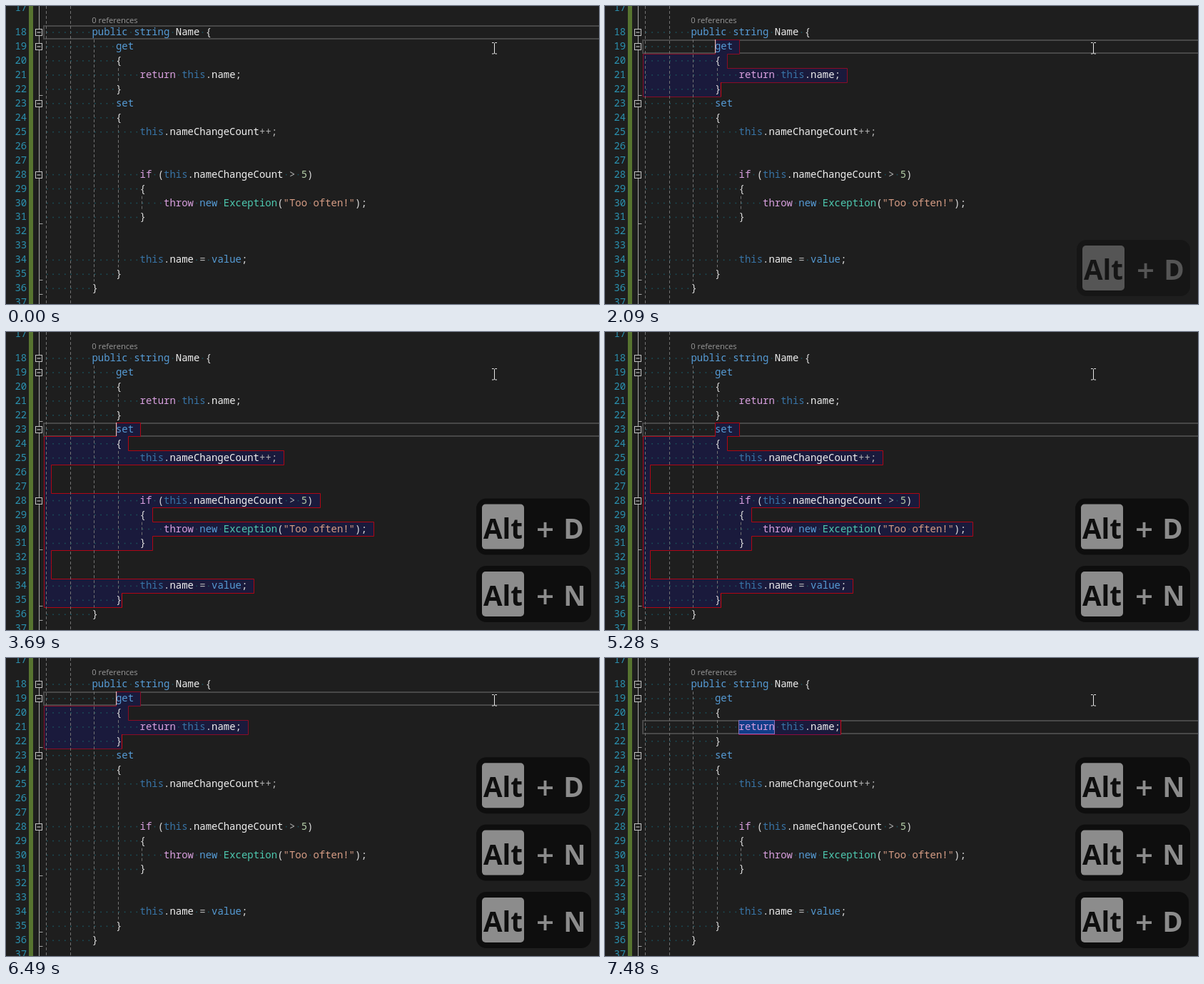
Recreate the animation shown at these times as an HTML page. Size 831x418 px, loop 8000 ms.

```html
<!DOCTYPE html>
<html lang="en">
<head>
<meta charset="utf-8">
<title>Code selection</title>
<style>
  html, body { margin: 0; width: 100%; height: 100%; overflow: hidden; background: #1e1e1e; }
  svg { display: block; width: 831px; height: 418px; }
  .code { font: 13.96px "Noto Sans Mono", "DejaVu Sans Mono", monospace; }
  .lens { font: 11.2px "Open Sans", "Noto Sans", sans-serif; }
  .key { font: 700 38.5px "Open Sans", "Noto Sans", sans-serif; }
  .plus { font: 600 44px "Open Sans", "Noto Sans", sans-serif; }
  .badge { font: 10px "Open Sans", "Noto Sans", sans-serif; }
</style>
</head>
<body>
<svg viewBox="0 0 831 418">
  <rect width="831" height="418" fill="#1e1e1e"/>
  <g id="backLayer"></g>
  <g id="codeLayer"></g>
  <g id="frontLayer"></g>
</svg>
<script>
(() => {
const FIRST = 18, ROW = 19.96, LEFT = 53.5, CHAR = 8.376, LOOP = 8000;

// [indent, text] for each line from FIRST on
const lines = [
  [8, 'public string Name {'],
  [12, 'get'],
  [12, '{'],
  [16, 'return this.name;'],
  [12, '}'],
  [12, 'set'],
  [12, '{'],
  [16, 'this.nameChangeCount++;'],
  [0, ''],
  [0, ''],
  [16, 'if (this.nameChangeCount > 5)'],
  [16, '{'],
  [20, 'throw new Exception("Too often!");'],
  [16, '}'],
  [0, ''],
  [0, ''],
  [16, 'this.name = value;'],
  [12, '}'],
  [8, '}']
];

const colX = col => LEFT + col * CHAR;
const rowTop = n => 27.2 + (n - FIRST) * ROW;
const baseline = n => rowTop(n) + 13.8;
const escapeText = s => s.replace(/&/g, '&amp;').replace(/</g, '&lt;').replace(/>/g, '&gt;');
const rect = (x, y, w, h, fill, extra = '') =>
  `<rect x="${x}" y="${y}" width="${w}" height="${h}" fill="${fill}" ${extra}/>`;
const text = (x, y, cls, fill, s) =>
  `<text x="${x}" y="${y}" class="${cls}" fill="${fill}">${escapeText(s)}</text>`;
const path = (d, stroke, extra = '') =>
  `<path d="${d}" fill="none" stroke="${stroke}" ${extra}/>`;

function color(token) {
  if (token === 'this') return '#3874a6';
  if (/^(public|string|get|set|new|value)$/.test(token)) return '#569cd6';
  if (/^(return|if|throw)$/.test(token)) return '#d8a0df';
  if (token === 'Exception') return '#4ec9b0';
  if (token[0] === '"') return '#d69d85';
  if (/^\d/.test(token)) return '#b5cea8';
  if (/^[>=+]/.test(token)) return '#b4b4b4';
  return /^\w/.test(token) ? '#f0f0f0' : '#dcdcdc';
}

function codeLine([indent, source], i) {
  const n = FIRST + i;
  let out = '';
  for (const m of source.matchAll(/"[^"]*"|\w+|[^\w\s"]+/g))
    out += text(colX(indent + m.index), baseline(n), 'code', color(m[0]), m[0]);
  [...' '.repeat(indent) + source].forEach((c, col) => {
    if (c === ' ') out += rect(colX(col + 0.5) - 0.8, rowTop(n) + 9, 1.6, 1.6, '#1b505b');
  });
  return out;
}

function editor() {
  let out = rect(32, 0, 6, 418, '#577430') + path('M46.5 0V418', '#a5a5a5');
  for (const n of [22, 31, 35, 36])
    out += path(`M46.5 ${Math.round(rowTop(n + 1)) - 1.5}h5`, '#a5a5a5');
  for (const n of [18, 19, 23, 28]) {
    const y = Math.round(rowTop(n)) + 5.5;
    out += rect(41.5, y, 9, 9, '#1e1e1e', 'stroke="#c4c4c4"') + path(`M43.5 ${y + 4.5}h5`, '#e0e0e0');
  }
  const guides = [[56.5, 0, 418], [90.5, 0, 418], [123.5, rowTop(19), rowTop(36)],
    [157.5, rowTop(21), rowTop(22)], [157.5, rowTop(25), rowTop(35)], [190.5, rowTop(30), rowTop(31)]];
  for (const [x, y1, y2] of guides)
    out += path(`M${x} ${y1}V${y2}`, '#727272', 'stroke-dasharray="4 3"');
  out += text(12.5, 7, 'code', '#2b91af', '17');
  for (let n = FIRST; n <= 37; n++) out += text(12.5, baseline(n), 'code', '#2b91af', String(n));
  out += text(120.3, 24, 'lens', '#999', '0 references');
  return out + lines.map(codeLine).join('');
}

function selection(from, to, stroke) {
  const x0 = colX(lines[from - FIRST][0]);
  const pts = [[x0, rowTop(from)]];
  let end;
  for (let n = from; n <= to; n++) {
    const [indent, source] = lines[n - FIRST];
    end = colX(indent + source.length) + (n < to ? 9.6 : 0.5);
    pts.push([end, rowTop(n)], [end, rowTop(n + 1)]);
  }
  if (to > from) pts.push([LEFT, rowTop(to + 1)], [LEFT, rowTop(from + 1)]);
  pts.push([x0, rowTop(from + 1)]);
  const snapped = pts.map(p => p.map(v => Math.floor(v) + 0.5).join()).join(' ');
  return `<polygon points="${snapped}" fill="#1a1a3c" stroke="${stroke}"/>` +
    path(`M${Math.floor(end) + 0.5} ${rowTop(to)}v${ROW}`, '#cc0812');
}

const currentLine = n =>
  rect(53, Math.round(rowTop(n)) + 1, 790, 18, 'none', 'stroke="#484848" stroke-width="2"');

function panel(letter, x, y, opacity) {
  return `<g transform="translate(${x} ${y})" opacity="${opacity}">` +
    rect(0, 0, letter === 'N' ? 161 : 159, 79, '#0e0e0e', 'rx="14" fill-opacity=".96"') +
    rect(8, 8, 59, 63, '#8c8c8c', 'rx="5"') +
    text(10, 56, 'key', '#0e0e0e', 'Alt') +
    text(84, 59, 'plus', '#8c8c8c', '+') +
    text(122.3, 56, 'key', '#8c8c8c', letter) + '</g>';
}

function panels(letters, topOpacity) {
  const x = letters.includes('N') ? 659 : 661;
  return [...letters].map((c, i) =>
    panel(c, x, 328 - 94.4 * (letters.length - 1 - i), i ? 1 : topOpacity)).join('');
}

const pointer = path('M681 51.5h2.5l1 1l1-1h2.5M684.5 52.5V66M681 67h2.5l1-1l1 1h2.5', '#e8e8e8');

// The last entry whose start has passed
const at = (t, steps) => steps.filter(s => s[0] <= t).pop();

const cursorLines = [[0, 18], [2090, 19], [3690, 23], [5530, 19], [6990, 21]];
const blinks = [390, 830, 1360, 1960, 2090, 2630, 3160, 3690, 4220, 4750, 5280, 5530, 5990, 6490, 6990, 7480];
const resets = [2090, 3690, 5530, 6990];
const keys = [[0, '', 1], [2090, 'D', 0.5], [2210, 'D', 1], [3690, 'DN', 1], [5530, 'DNN', 1],
  [6990, 'DNND', 0.9], [7110, 'DNND', 0.4], [7230, 'NND', 1]];
const blocks = { 19: [19, 22, '#8a0c26'], 23: [23, 35, '#b00614'], 21: [21, 21, '#8a0c40'] };

function caretOn(t) {
  let on = false;
  for (const b of blinks) if (b <= t) on = resets.includes(b) || !on;
  return on;
}

function scene(t) {
  const n = at(t, cursorLines)[1];
  let back = currentLine(n), front = '';
  if (blocks[n]) back += selection(...blocks[n]);
  if (t >= 7230) back += rect(187.5, 87.5, 50, 19, '#113d88', 'stroke="#8b6fb5"');
  if (caretOn(t))
    front += rect(n === 21 ? 187 : 154, Math.round(rowTop(n)), 1.2, 19, n === 18 ? '#dcdcdc' : '#e6b4b4');
  if (t >= 250 && t < 2090)
    front += rect(150, 0, 16, 12, '#3a3a3a') + text(155, 7, 'badge', '#858585', '2');
  const [, letters, opacity] = at(t, keys);
  return [back, front + panels(letters, opacity) + pointer];
}

const shown = {};
function show(id, markup) {
  if (shown[id] !== markup) document.getElementById(id).innerHTML = shown[id] = markup;
}

function draw() {
  const [back, front] = scene(performance.now() % LOOP);
  show('backLayer', back);
  show('frontLayer', front);
  requestAnimationFrame(draw);
}

show('codeLayer', editor());
draw();
})();
</script>
</body>
</html>
```
